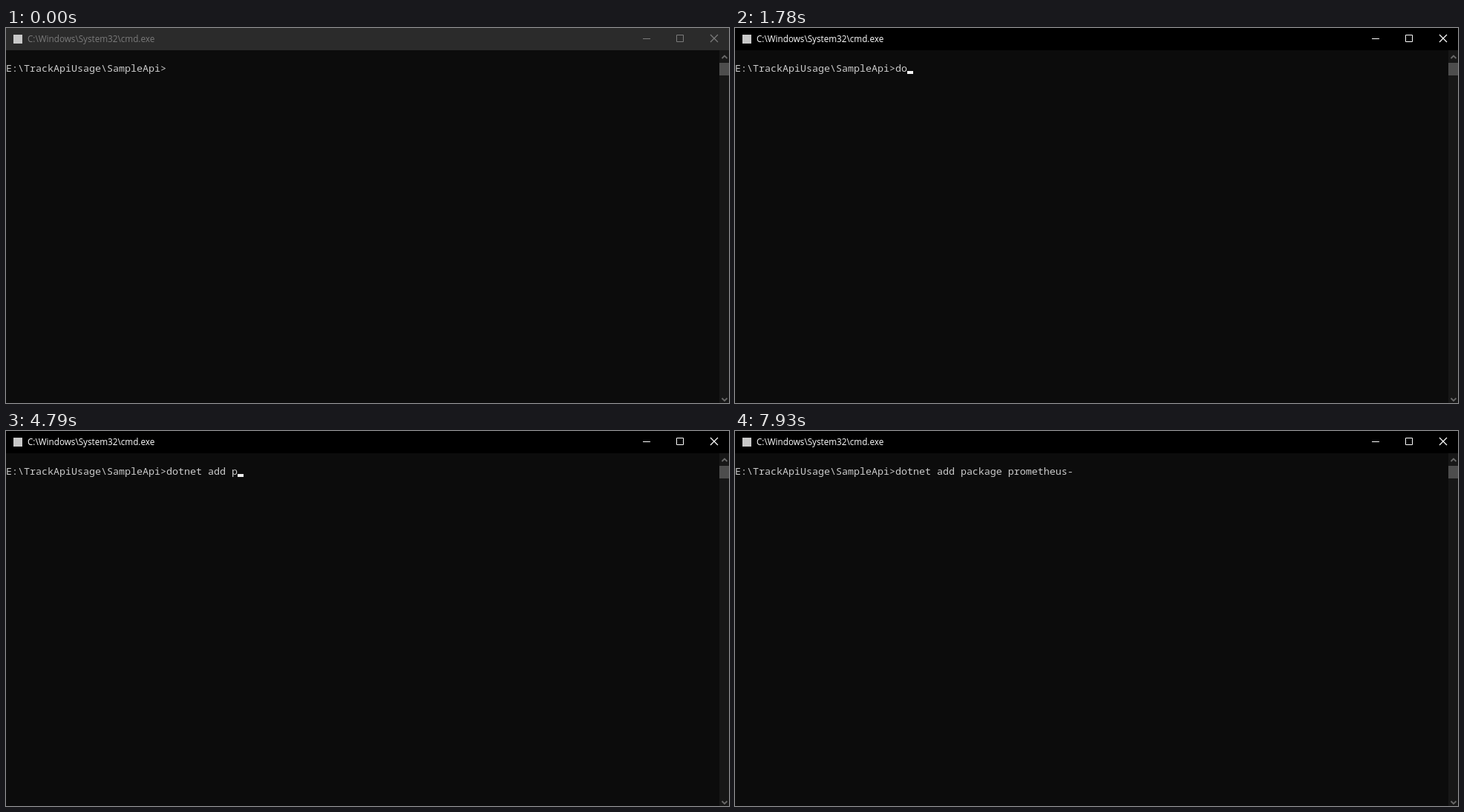
Animation, 974 px wide and 506 px high, one loop 8 s. Source, as an HTML page:

```html
<!DOCTYPE html>
<html lang="en">
<head>
<meta charset="utf-8">
<title>Terminal</title>
<style>
  html, body { margin: 0; width: 100%; height: 100%; overflow: hidden; background: #0c0c0c; }
  svg { display: block; width: 974px; height: 506px; }
  #bar { fill: #2b2b2b; }
  #chrome { color: #7b7b7b; }
  .active #bar { fill: #000; }
  .active #chrome { color: #fff; }
  #title { font: 11.7px "Open Sans", "Noto Sans", sans-serif; fill: currentColor; }
  #buttons { fill: none; stroke: currentColor; }
  #line { font: 13.333px "Noto Sans Mono", "DejaVu Sans Mono", monospace; fill: #ccc; white-space: pre; }
  .arrow { fill: none; stroke: #686868; stroke-width: 1.8; }
</style>
</head>
<body>
<svg id="stage" viewBox="0 0 974 506">
  <rect width="974" height="506" fill="#0c0c0c"/>

  <rect id="bar" width="974" height="30"/>
  <rect x="10" y="9" width="12" height="12" fill="#c8c8c8"/>
  <g id="chrome">
    <text id="title" x="29" y="19">C:\Windows\System32\cmd.exe</text>
    <g id="buttons">
      <path d="M858 14.5h10M903.5 9.5h9v9h-9z"/>
      <path d="M949 9l10 10M959 9l-10 10" stroke-width="1.2"/>
    </g>
  </g>

  <rect x="961" y="30" width="13" height="476" fill="#171717"/>
  <rect x="961" y="47" width="13" height="17" fill="#4d4d4d"/>
  <path class="arrow" d="M964.5 41l3.5-3.5 3.5 3.5M964.5 499.5l3.5 3.5 3.5-3.5"/>

  <text id="line" x="0" y="59" xml:space="preserve"></text>
  <rect id="caret" y="58" width="8" height="4" fill="#f2f2f2"/>

  <path id="mouse" d="M0 0v15.5l3.5-3.3 2.5 5.6 2.3-1-2.5-5.4h4.8z" fill="#fff"/>
</svg>
<script>
  const LOOP = 8000, BLINK = 530, CELL = 8;
  const PROMPT = 'E:\\TrackApiUsage\\SampleApi>';

  // Bursts of even typing: text, time of first key, time of last key
  const BURSTS = [
    ['do', 1640, 1780],
    ['tnet ', 2050, 3010],
    ['add p', 3560, 4110],
    ['acka', 4920, 5340],
    ['ge pr', 5610, 6150],
    ['ome', 6430, 6560],
    ['theus-', 6700, 7790]
  ];
  const KEYS = BURSTS.flatMap(([text, from, to]) =>
    [...text].map((char, i) => ({ char, time: from + (to - from) * i / (text.length - 1) })));

  const ENTER = 140, FOCUS = 400;

  const el = id => document.getElementById(id);
  const show = (node, on) => node.setAttribute('visibility', on ? 'visible' : 'hidden');
  const lerp = (a, b, u) => a + (b - a) * u;
  const stage = el('stage'), line = el('line'), caret = el('caret'), mouse = el('mouse');

  function drawLine(t) {
    const typed = KEYS.filter(key => key.time <= t);
    const text = PROMPT + typed.map(key => key.char).join('');
    if (line.textContent !== text) line.textContent = text;

    // The caret also shows briefly after each key
    const blinkOn = Math.floor(t / BLINK) % 2 === 1;
    const justTyped = typed.length > 0 && t - typed[typed.length - 1].time < 130;
    caret.setAttribute('x', text.length * CELL);
    show(caret, blinkOn || justTyped);
  }

  function drawMouse(t) {
    const u = Math.min(1, Math.max(0, (t - ENTER) / (FOCUS - ENTER)));
    const ease = 1 - (1 - u) ** 2;
    mouse.setAttribute('transform', `translate(${lerp(809, 730, ease)} ${lerp(472, 379.5, ease)})`);
    show(mouse, t >= ENTER && t < KEYS[0].time);
  }

  function draw(t) {
    stage.classList.toggle('active', t >= FOCUS);
    drawLine(t);
    drawMouse(t);
  }

  const start = performance.now();
  function tick() {
    draw((performance.now() - start) % LOOP);
    requestAnimationFrame(tick);
  }
  tick();
</script>
</body>
</html>
```
